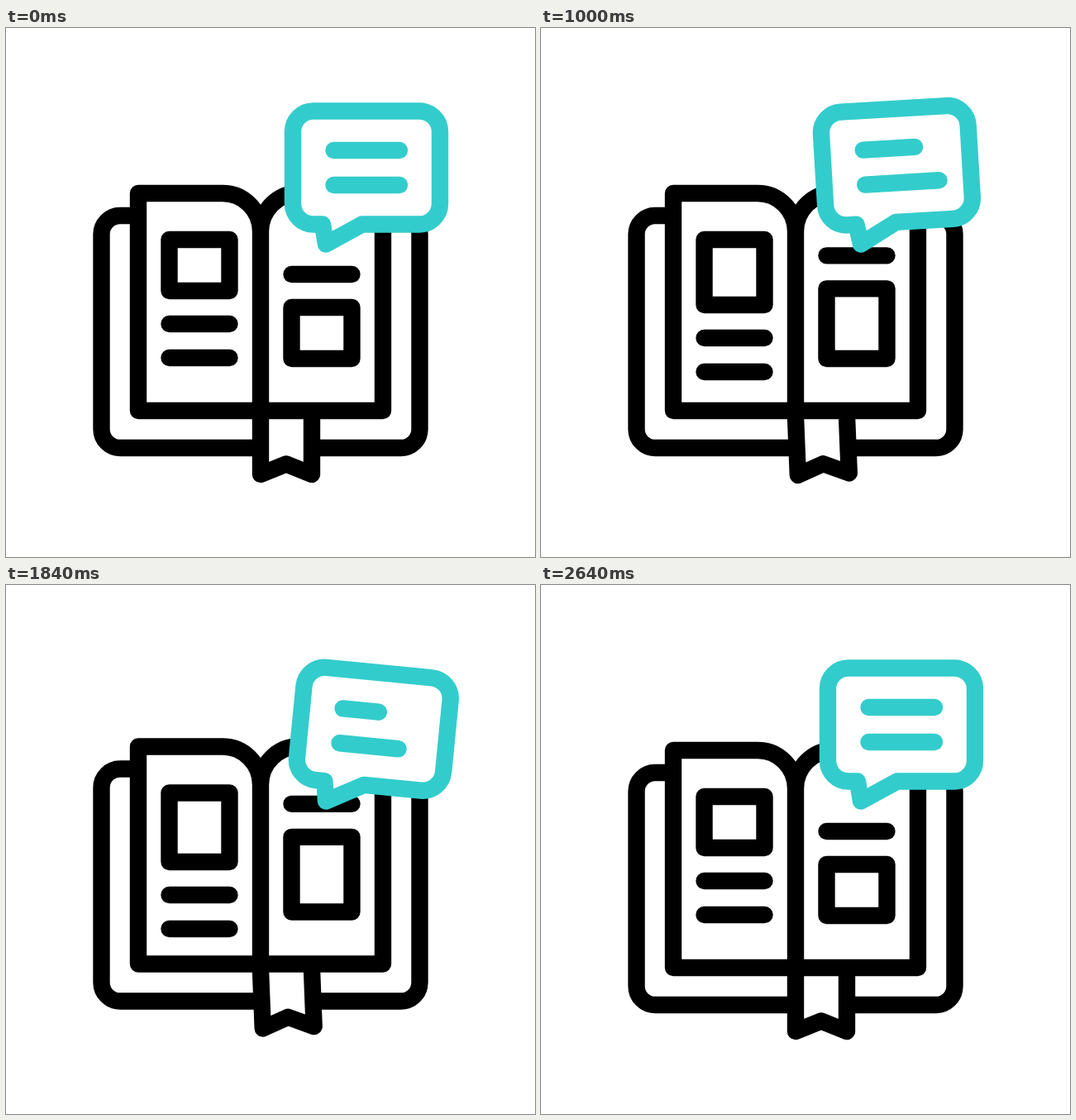
Animation of 640 by 640 pixels, one loop 3000 ms. Source, as an HTML page:

```html
<!DOCTYPE html>
<html lang="en">
<head>
<meta charset="utf-8">
<title>Open book with a note</title>
<style>
  html, body { margin: 0; width: 100%; height: 100%; overflow: hidden; background: #fff; }
  svg { display: block; width: 100%; height: 100%; }
  #book, #bubble {
    fill: none; stroke-width: 20.4; stroke-linecap: round; stroke-linejoin: round;
  }
  #book { stroke: #000; }
  #bubble { stroke: #33cccc; }
  .paper { fill: #fff; }
</style>
</head>
<body>
<svg viewBox="0 0 640 640">
  <g id="book">
    <rect x="115.5" y="227" width="385" height="281" rx="22.5"/>
    <path id="ribbon" class="paper" d="M308 463V540L339 527.5L370 540V463"/>
    <path class="paper" d="M308 463H160V200H262A46 46 0 0 1 308 246A46 46 0 0 1 354 200H456V463ZV246"/>
    <rect id="leftBox" x="197.5" y="256" width="73"/>
    <path id="leftLines" d="M197.5 358h73m-73 41h73"/>
    <rect id="rightBox" x="345.5" width="73"/>
    <path id="rightLine" d="M345.5 298h73"/>
  </g>
  <g id="bubble">
    <path class="paper" d="M372 100.5H500A25 25 0 0 1 525 125.5V212.5A25 25 0 0 1 500 237.5H431L387 261.5L383 237.5H372A25 25 0 0 1 347 212.5V125.5A25 25 0 0 1 372 100.5Z"/>
    <path id="line1"/>
    <path id="line2"/>
  </g>
</svg>
<script>
  const LOOP = 3000, STEP = 40, START = 200, END = 2640;
  const BEATS = [740, 1000, 1320, 1560, 1840, 2200];
  const $ = id => document.getElementById(id);
  const set = (id, name, value) => $(id).setAttribute(name, value);

  // Smooth swing from rest, through one value per beat, back to rest.
  function swing(values, end = END) {
    const times = [START, ...BEATS, end], v = [0, ...values, 0], last = v.length - 1;
    const tangent = i => i === 0 || i === last ? 0
      : (v[i + 1] - v[i - 1]) / (times[i + 1] - times[i - 1]);
    return t => {
      if (t <= START || t >= end) return 0;
      const b = times.findIndex(time => time > t), a = b - 1;
      const d = times[b] - times[a], u = (t - times[a]) / d, w = 1 - u;
      return w * w * (1 + 2 * u) * v[a] + u * u * (3 - 2 * u) * v[b]
        + d * u * w * (w * tangent(a) - u * tangent(b));
    };
  }

  const bob = swing([34, 0, -10, 18, -4.5, 8]);
  const tilt = swing([18, -3.4, -2.6, 0, 5.6, 4], 2440);
  const sway = swing([-2.3, -2.3, 6.5, 2, -2.2, -1.7]);
  const grow = swing([29.5, 17, -20, 0, 21.5, 23]);
  const write1 = swing([-20, -17, 17, -10, -36, 21]);
  const write2 = swing([-56, 10, -4, -6, -8, 14]);

  function draw(t) {
    const left = grow(t), right = left * 4 / 3;
    set('book', 'transform', `translate(0 ${bob(t)})`);
    set('ribbon', 'transform', `rotate(${sway(t)} 334 470)`);
    set('leftBox', 'height', 62 + left);
    set('leftLines', 'transform', `translate(0 ${left})`);
    set('rightBox', 'y', 338 - right);
    set('rightBox', 'height', 62 + right);
    set('rightLine', 'transform', `translate(0 ${-right})`);
    set('bubble', 'transform', `rotate(${tilt(t)} 387 262)`);
    set('line1', 'd', `M396.5 148h${79.5 + write1(t)}`);
    set('line2', 'd', `M396.5 190h${79.5 + write2(t)}`);
  }

  const origin = performance.now();
  function frame() {
    const t = (performance.now() - origin) % LOOP;
    draw(Math.floor(t / STEP) * STEP);
    requestAnimationFrame(frame);
  }
  frame();
</script>
</body>
</html>
```
